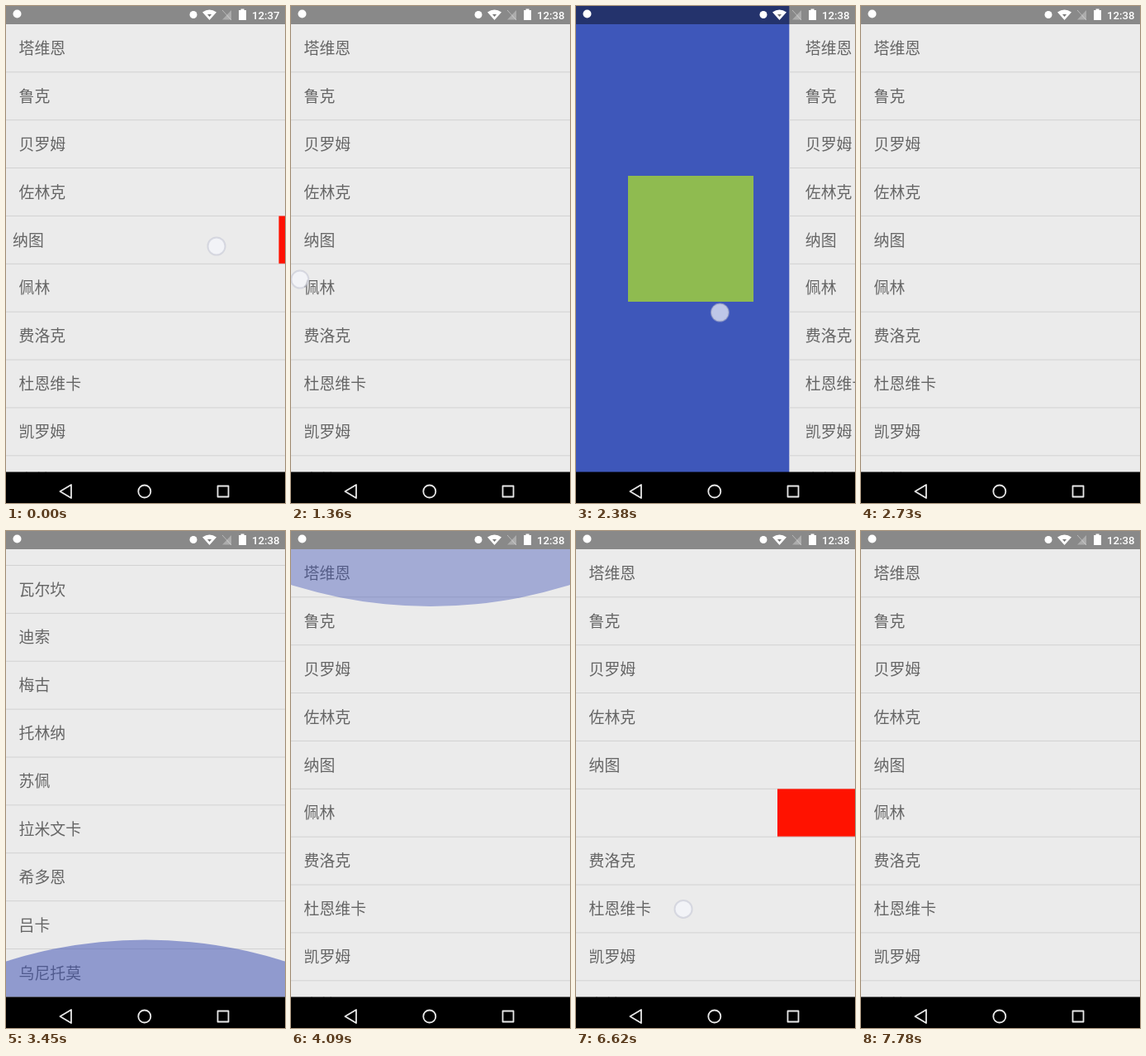
An HTML page that plays this animation: 338 by 600 pixels, repeating every 8000 ms.

```html
<!DOCTYPE html>
<html lang="zh">
<head>
<meta charset="utf-8">
<style>
  html, body { margin: 0; width: 100%; height: 100%; overflow: hidden; background: #000; }
  svg { display: block; width: 100%; height: 100%; }
  .name { font: 18.9px "Noto Sans CJK SC", "Noto Sans CJK", sans-serif; fill: #656565; }
  .clock { font: 500 13.2px Roboto, sans-serif; fill: #fff; }
</style>
</head>
<body>
<svg viewBox="0 0 338 600">
  <defs>
    <clipPath id="listArea"><rect x="-4" y="22" width="342" height="540.5"/></clipPath>
  </defs>
  <rect width="338" height="600" fill="#3e57ba"/>
  <rect x="63" y="205" width="152" height="152" fill="#8fbb50"/>

  <g id="content">
    <rect x="-4" width="346" height="563" fill="#ebebeb"/>
    <g clip-path="url(#listArea)">
      <g id="rows"></g>
      <circle id="glowTop" cx="169" cy="-493" r="562" fill="#3f51b5"/>
      <circle id="glowBottom" cx="169" cy="-493" r="562" fill="#3f51b5"/>
    </g>
  </g>

  <rect width="338" height="22" fill="#000" opacity=".42"/>
  <g fill="#fff">
    <circle cx="13.5" cy="9.5" r="5"/>
    <circle cx="227" cy="10.5" r="4.5"/>
    <path d="M238 7.5Q246.500 1.500 255 7.500L246.500 17Z"/>
    <path d="M244 10h5l-2.500 3z" fill="#777"/>
    <path d="M273 5V16.500H262Z" opacity=".3"/>
    <path d="M262 5L273 17" stroke="#fff" opacity=".4"/>
    <path d="M282 5h2.500V3.500h4V5H291V17h-9z"/>
  </g>
  <text id="clock" class="clock" x="298" y="15.500"></text>

  <rect y="562.5" width="338" height="37.5"/>
  <g fill="none" stroke="#e8e8e8" stroke-width="1.8" stroke-linejoin="round">
    <path d="M65.500 586L79 578V594Z"/>
    <circle cx="167.800" cy="586" r="7.500"/>
    <rect x="256.500" y="579.500" width="13" height="13"/>
  </g>
  <circle id="touch" r="10.5" fill="#f5f7fc" fill-opacity=".7" stroke="#bec0d0" stroke-opacity=".5" stroke-width="2"/>
</svg>
<script>
const LOOP = 8000, TOP = 22, BOTTOM = 562.5, PITCH = 57.88;
const names = ['塔维恩', '鲁克', '贝罗姆', '佐林克', '纳图', '佩林', '费洛克', '杜恩维卡', '凯罗姆', '索甘',
  '维莫', '瓦尔坎', '迪索', '梅古', '托林纳', '苏佩', '拉米文卡', '希多恩', '吕卡', '乌尼托莫'];
const maxScroll = names.length * PITCH - (BOTTOM - TOP);
const OPEN = 94, DRAWER = 279;
const $ = id => document.getElementById(id);

function node(parent, tag, attrs) {
  const el = document.createElementNS('http://www.w3.org/2000/svg', tag);
  for (const key in attrs) el.setAttribute(key, attrs[key]);
  return parent.appendChild(el);
}

const rows = names.map((name, i) => {
  const y = TOP + i * PITCH;
  const red = node($('rows'), 'rect', { y, height: PITCH, fill: '#ff1200' });
  const text = node($('rows'), 'text', { x: 15.5, y: y + 36, class: 'name' });
  text.textContent = name;
  node($('rows'), 'rect', { x: -4, y: y + PITCH - 0.6, width: 346, height: 1, fill: '#d2d2d2' });
  return { red, text };
});

const linear = p => p;
const easeOut = p => 1 - (1 - p) ** 2;

// Keys are [time, value, easing into this key].
function track(t, keys) {
  if (t <= keys[0][0]) return keys[0][1];
  for (let i = 1; i < keys.length; i++) {
    const [t0, a] = keys[i - 1], [t1, b, ease = linear] = keys[i];
    if (t < t1) return a + (b - a) * ease((t - t0) / (t1 - t0));
  }
  return keys[keys.length - 1][1];
}

const drawerKeys = [[1380, 0], [1560, 165], [1750, DRAWER, easeOut], [2290, DRAWER],
  [2380, 263], [2600, 118], [2730, 0, easeOut]];
const scrollKeys = [[2970, 0], [3150, 280], [3400, maxScroll, easeOut],
  [3800, maxScroll], [3930, maxScroll - 300], [4050, 0]];
const swipeKeys = {
  4: [[30, 7.5], [260, OPEN, easeOut], [670, OPEN], [990, 0, easeOut],
    [4560, 0], [4850, OPEN, easeOut], [5280, OPEN], [5590, 0, easeOut]],
  5: [[5760, 0], [6050, 47], [6380, OPEN], [7380, OPEN], [7780, 0, easeOut]]
};
const glowTopKeys = [[4010, 0], [4070, 1], [4120, 1], [4380, 0, easeOut]];
const glowBottomKeys = [[3380, 0], [3450, 1], [3520, 1], [3740, 0, easeOut]];

// Each gesture is a list of [time, x, y]; it fades after its last point.
const gestures = [
  [[0, 255, 290], [30, 255, 290], [190, 165, 292]],
  [[1360, 10, 330], [1560, 170, 340]],
  [[1930, 162, 351], [1960, 163, 351], [2250, 191, 365], [2380, 175, 370], [2600, 30, 375]],
  [[2970, 200, 450], [3150, 195, 180]],
  [[3800, 190, 200], [3930, 195, 440]],
  [[4560, 260, 282], [4760, 120, 312]],
  [[5720, 270, 340], [6050, 215, 415], [6850, 96, 473], [6970, 96, 473]]
];
const FADE = 100;

function drawTouch(t) {
  const path = gestures.find(g => t >= g[0][0] && t < g[g.length - 1][0] + FADE);
  const touch = $('touch');
  if (!path) return touch.setAttribute('opacity', 0);
  const end = path[path.length - 1][0];
  touch.setAttribute('cx', track(t, path.map(([time, x]) => [time, x])));
  touch.setAttribute('cy', track(t, path.map(([time, , y]) => [time, y])));
  touch.setAttribute('opacity', t > end ? 1 - (t - end) / FADE : 1);
}

function drawGlow(el, y, direction, amount, alpha) {
  el.setAttribute('transform', `translate(0 ${y}) scale(1 ${direction * Math.max(amount, 0.001)})`);
  el.setAttribute('opacity', alpha * amount);
}

function draw(t) {
  $('content').setAttribute('transform', `translate(${track(t, drawerKeys)} 0)`);
  $('rows').setAttribute('transform', `translate(0 ${-track(t, scrollKeys)})`);
  for (const i in swipeKeys) {
    const shift = track(t, swipeKeys[i]);
    rows[i].text.setAttribute('x', 15.5 - shift);
    rows[i].red.setAttribute('x', 338 - shift);
    rows[i].red.setAttribute('width', shift);
  }
  drawGlow($('glowTop'), TOP, 1, track(t, glowTopKeys), 0.42);
  drawGlow($('glowBottom'), BOTTOM, -1, track(t, glowBottomKeys), 0.52);
  drawTouch(t);
  $('clock').textContent = t < 410 ? '12:37' : '12:38';
}

const start = performance.now();
function tick() {
  draw((performance.now() - start) % LOOP);
  requestAnimationFrame(tick);
}
tick();
</script>
</body>
</html>
```
